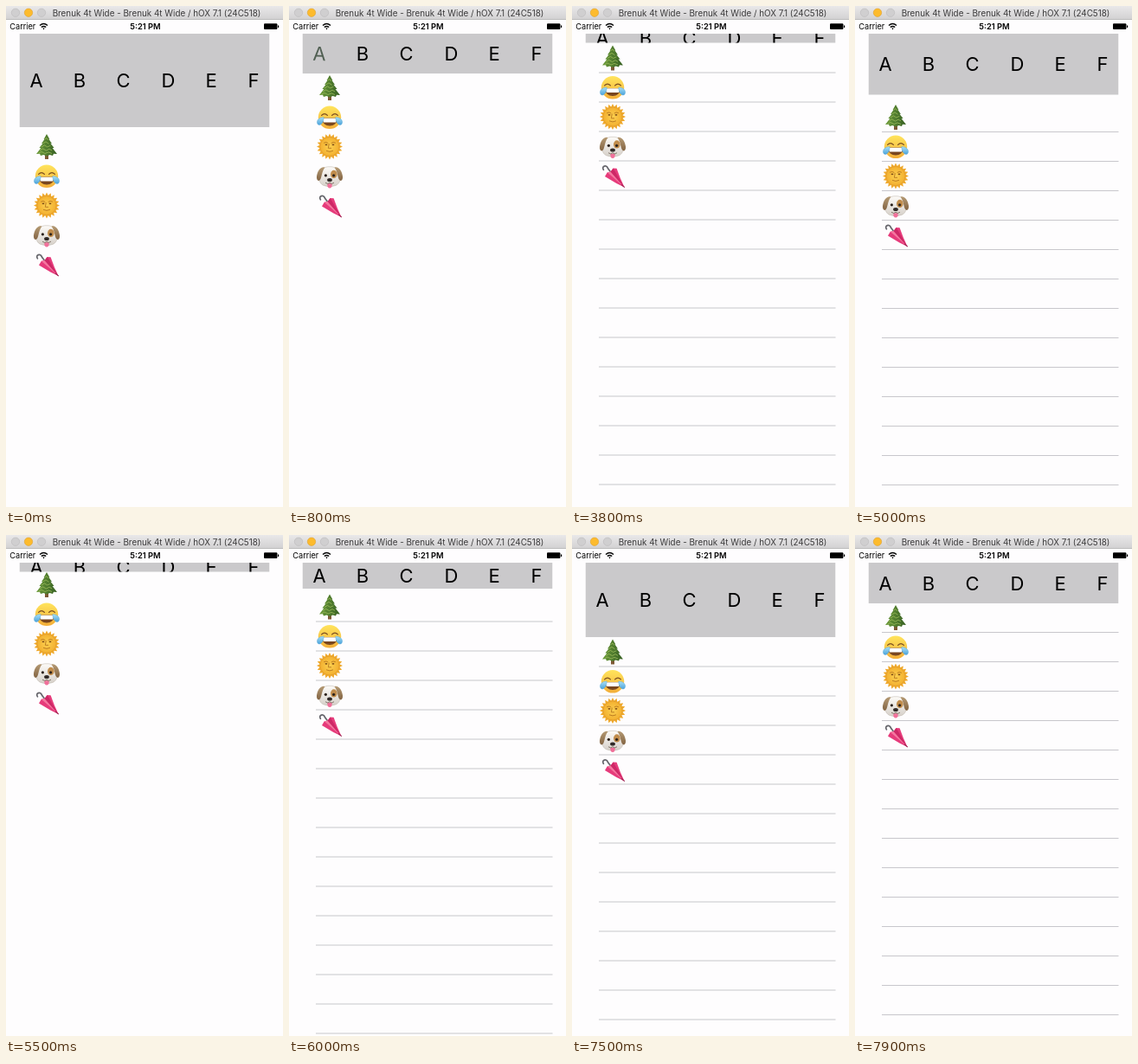
Animation of 320 by 579 pixels, one loop 8 s. Source, as an HTML page:

```html
<!DOCTYPE html>
<html lang="en">
<head>
<meta charset="utf-8">
<title>Pull to refresh</title>
<style>
  html, body { margin: 0; width: 100%; height: 100%; overflow: hidden; background: #fefdfe; }
  svg { display: block; }
  text { font-family: Inter, "Liberation Sans", sans-serif; text-anchor: middle; }
  .letter { font-size: 22px; }
</style>
</head>
<body>
<svg id="stage" width="320" height="579" viewBox="0 0 320 579">
  <defs>
    <linearGradient id="bar" x2="0" y2="1"><stop stop-color="#e9e8e9"/><stop offset="1" stop-color="#d1d0d1"/></linearGradient>
    <linearGradient id="face" x2="0" y2="1"><stop stop-color="#ffe45c"/><stop offset="1" stop-color="#f3ae38"/></linearGradient>
    <radialGradient id="sun"><stop stop-color="#fbd050"/><stop offset="1" stop-color="#f3b030"/></radialGradient>
    <linearGradient id="fur" x2="0" y2="1"><stop stop-color="#fdfbf8"/><stop offset="1" stop-color="#d6d0c9"/></linearGradient>
    <linearGradient id="ear" x2="0" y2="1"><stop stop-color="#b59a74"/><stop offset="1" stop-color="#836443"/></linearGradient>
    <linearGradient id="pine" x2="1" y2="0"><stop stop-color="#6b9a3a"/><stop offset="1" stop-color="#365f22"/></linearGradient>
    <linearGradient id="drop" x2="0" y2="1"><stop stop-color="#a9dff5"/><stop offset="1" stop-color="#4ba3dc"/></linearGradient>
  </defs>
  <rect width="320" height="579" fill="#fefdfe"/>

  <g id="list">
    <g id="lines" fill="#c8c7cc"></g>

    <g transform="translate(47 17)">
      <path d="M-2 9h4v5.5h-4z" fill="#7d5a35"/>
      <path d="M0-14.5 3.4-8.5 2.4-8.8 6-3.5 4.4-3.8 8.6 1.6 6.6 1.6 12 8.4 8 8.2 7 10.4 3.6 9.4 0 11-3.6 9.4-7 10.4-8 8.2-12 8.4-6.6 1.6-8.6 1.6-4.4-3.8-6-3.5-2.4-8.8-3.4-8.5Z" fill="url(#pine)"/>
      <path d="M-2-8.4 0-10 1.6-7.6M-4-3.8-1-5.6 2.6-3.2M-6 .4-2.6-1.6 .6.4 4.4-1.2M-8 4.6-4.4 2.4-.4 4.6 3 2.6 6 4.4M-9.4 7.6-6 6 -2 8 2 6.4 6 8" fill="none" stroke="#a5c261" stroke-width=".9" opacity=".8"/>
    </g>

    <g transform="translate(47 51.3)">
      <circle r="13.2" fill="url(#face)"/>
      <path d="M-9 .6H9C9 12.6-9 12.6-9 .6Z" fill="#79461f"/>
      <path d="M-8.4 1H8.4Q8.2 4 7 5.6H-7Q-8.2 4-8.4 1Z" fill="#fff"/>
      <path d="M-9.4-2.4Q-6-6-2.6-2.4M2.6-2.4Q6-6 9.4-2.4" fill="none" stroke="#7d5022" stroke-width="1.3" stroke-linecap="round"/>
      <path id="tear" d="M-6.8-.2C-12.4-.4-16 4-14 7.6-11.4 10.6-7 7-6.8-.2Z" fill="url(#drop)" stroke="#4c9fd2" stroke-width=".4"/>
      <use href="#tear" transform="scale(-1 1)"/>
    </g>

    <g transform="translate(47 85)">
      <path id="rays" fill="#efa92c"/>
      <circle r="11" fill="url(#sun)" stroke="#e0992a" stroke-width=".6"/>
      <path d="M-6.5-4.4Q-4-6-2-4.2M2-4.2Q4-6 6.5-4.4M-.8-3-1.6 1.8H1.6M-3.6 5Q0 7 3.6 5" fill="none" stroke="#bd7d22" stroke-linecap="round"/>
      <ellipse cx="-4" cy="-2.2" rx="1.4" ry=".9" fill="#7d4d18"/>
      <ellipse cx="4" cy="-2.2" rx="1.4" ry=".9" fill="#7d4d18"/>
    </g>

    <g transform="translate(47 120.3)">
      <path d="M0-12C6-12.5 9-9 10.5-4 13 1 12.5 7 7.5 9.4 3 11.2-3 11.2-7.5 9.4-12.5 7-13 1-10.5-4-9-9-6-12.5 0-12Z" fill="url(#fur)" stroke="#b8b0a6" stroke-width=".5"/>
      <path id="flap" d="M-5.5-11.4C-11-12.5-14-7-15-1-15.6 3.4-12.8 5.6-11 3-9-.5-9.4-6-5.5-11.4Z" fill="url(#ear)"/>
      <use href="#flap" transform="scale(-1 1)"/>
      <ellipse cx="4.8" cy="-3.4" rx="3.8" ry="4.6" fill="#c08c4c"/>
      <circle cx="-4.6" cy="-2" r="1.6" fill="#2b211b"/>
      <circle cx="4.6" cy="-2" r="1.6" fill="#2b211b"/>
      <path d="M-2.6 7.4H2.6V10.6Q0 15-2.6 10.6Z" fill="#f0709a"/>
      <path d="M-5 6.4Q-2 9 0 6.4 2 9 5 6.4" fill="none" stroke="#7a6c60" stroke-width=".9"/>
      <ellipse cy="3.2" rx="2.9" ry="2" fill="#2f2826"/>
    </g>

    <g transform="translate(47 153.5)">
      <path d="M-3-5.5-5.6-9C-7-13.6-13.4-11.4-10.6-7.2" fill="none" stroke="#66666c" stroke-width="1.7" stroke-linecap="round"/>
      <path d="M-9 .6-6.2-4.2-2.4-5 .6-9 4.6-8.8 9 3 13.6 13 4.4 8.6Z" fill="#e63b7b"/>
      <path d="M-6.2-4.2 13 12.6-2.4-5Z" fill="#f5769f"/>
      <path d="M-2.4-5 13 12.6.6-9Z" fill="#cd2866"/>
      <path d="M10 9.8 13.8 13.2" stroke="#9b2352" stroke-width="1.1"/>
    </g>
  </g>

  <svg id="header" x="15.5" y="32" width="289" overflow="hidden">
    <rect width="289" height="120" fill="#cac9cb"/>
  </svg>

  <rect width="320" height="16" fill="url(#bar)"/>
  <rect y="15.3" width="320" height=".7" fill="#b4b3b4"/>
  <g stroke-width=".6">
    <circle cx="11" cy="7.7" r="4.7" fill="#d0cfd0" stroke="#bab9ba"/>
    <circle cx="26" cy="7.7" r="4.7" fill="#fdbb2d" stroke="#dda02c"/>
    <circle cx="41" cy="7.7" r="4.7" fill="#d0cfd0" stroke="#bab9ba"/>
  </g>
  <text x="174" y="11.8" font-size="9.85" fill="#3c3b3c">Brenuk 4t Wide - Brenuk 4t Wide / hOX 7.1 (24C518)</text>

  <text x="19.3" y="27.4" font-size="9.2">Carrier</text>
  <g fill="none" stroke="#000" stroke-width="1.4">
    <path d="M39 22.6Q43.5 18.6 48 22.6M40.8 24.6Q43.5 22.2 46.2 24.6"/>
    <path d="M42.3 25.6h2.4L43.5 27.4Z" fill="#000" stroke="none"/>
  </g>
  <text x="161" y="27.4" font-size="9.3" font-weight="600">5:21 PM</text>
  <rect x="298" y="20.3" width="15.4" height="6.8" rx="1" fill="#000"/>
  <rect x="314" y="22.3" width="1.2" height="2.8" rx=".6" fill="#000"/>
</svg>

<script>
const NS = "http://www.w3.org/2000/svg";
const LOOP = 8000, TICK = 100;
const ROW = 34;

// time, top of the list, header height
const PULL = [
  [0, 145.5, 108], [100, 143, 108], [200, 128, 95], [300, 104, 71],
  [400, 90, 57], [500, 82, 50], [700, 77.5, 46], [3700, 77.5, 46],
  [3800, 43, 10.5], [4000, 32, 0], [4600, 32, 0], [4700, 36, 3],
  [4800, 50, 14], [4900, 82, 42], [5000, 111.5, 70.5], [5200, 119, 87],
  [5300, 84, 52], [5400, 52, 21], [5500, 40.5, 10.5], [5700, 32, 0],
  [5900, 32, 0], [6000, 66, 30], [6100, 50, 18], [6300, 32, 0],
  [6600, 32, 0], [7000, 43, 7], [7100, 77.5, 10.5], [7200, 114, 70],
  [7300, 145.5, 108], [7400, 146, 113], [7500, 118, 86], [7600, 92, 60],
  [7700, 84, 52], [7900, 78.5, 47]
];

// refresh animation: one slot per letter, then four slots of scaling
const REFRESH = { start: 796, end: 3700, slot: 134.6 };
const COLORS = ["#505f52", "#0000ff", "#ff8000", "#ff00ff", "#996633", "#ffff00", "#ff0000"];
const LETTERS = [["A", 35], ["B", 85], ["C", 135.5], ["D", 187.5], ["E", 237], ["F", 286]];

const $ = id => document.getElementById(id);
const list = $("list"), lines = $("lines"), header = $("header");

function add(parent, tag, attrs) {
  const el = document.createElementNS(NS, tag);
  for (const k in attrs) el.setAttribute(k, attrs[k]);
  return parent.appendChild(el);
}

for (let k = 1; k <= 16; k++) {
  add(lines, "rect", { x: 31, y: k * ROW - 0.5, width: 273.5, height: 1 });
}

const labels = LETTERS.map(([char, x]) => {
  const el = add(header, "text", { class: "letter", y: 8 });
  el.textContent = char;
  return { el, x: x - 15.5 };
});

const RAYS = 20;
$("rays").setAttribute("d", "M" + Array.from({ length: RAYS * 2 }, (_, i) => {
  const a = i * Math.PI / RAYS, r = i % 2 ? 11.6 : 15;
  return `${(r * Math.sin(a)).toFixed(2)} ${(-r * Math.cos(a)).toFixed(2)}`;
}).join("L") + "Z");

function pullAt(t) {
  const n = PULL.findIndex(k => k[0] > t);
  if (n < 0) return PULL[PULL.length - 1].slice(1);
  const a = PULL[n - 1], b = PULL[n];
  const f = (t - a[0]) / (b[0] - a[0]);
  return [1, 2].map(i => a[i] + (b[i] - a[i]) * f);
}

function lettersAt(t) {
  const pose = { active: -1, angle: 0, scale: 1, color: "#000" };
  if (t < REFRESH.start || t >= REFRESH.end) return pose;
  const count = LETTERS.length, slots = count + 4;
  const u = (t - REFRESH.start) / REFRESH.slot;
  const cycle = Math.floor(u / slots), v = u % slots;
  if (v < count) {
    const i = Math.floor(v), f = v - i;
    const out = f < 2 / 3;
    pose.active = i;
    pose.angle = 45 * (out ? f * 1.5 : (1 - f) * 3);
    if (out) pose.color = COLORS[(cycle * count + i) % COLORS.length];
  } else {
    const f = (v - count) / 4, peak = 0.35 / 0.6;
    pose.scale = 1 + 0.5 * (f < peak ? f / peak : (1 - f) / (1 - peak));
  }
  return pose;
}

function draw(t) {
  const [top, height] = pullAt(t);
  list.setAttribute("transform", `translate(0 ${top})`);
  header.setAttribute("height", height);
  const ruled = t >= 3700 && !(t >= 5500 && t < 5700);
  lines.style.display = ruled ? "" : "none";

  const pose = lettersAt(t);
  labels.forEach(({ el, x }, i) => {
    const on = i === pose.active;
    el.setAttribute("transform",
      `translate(${x} ${height / 2}) rotate(${on ? pose.angle : 0}) scale(${pose.scale})`);
    el.setAttribute("fill", on ? pose.color : "#000");
  });
}

const begin = performance.now();
function frame() {
  const t = (performance.now() - begin) % LOOP;
  draw(Math.floor(t / TICK) * TICK);
  requestAnimationFrame(frame);
}
frame();
</script>
</body>
</html>
```
